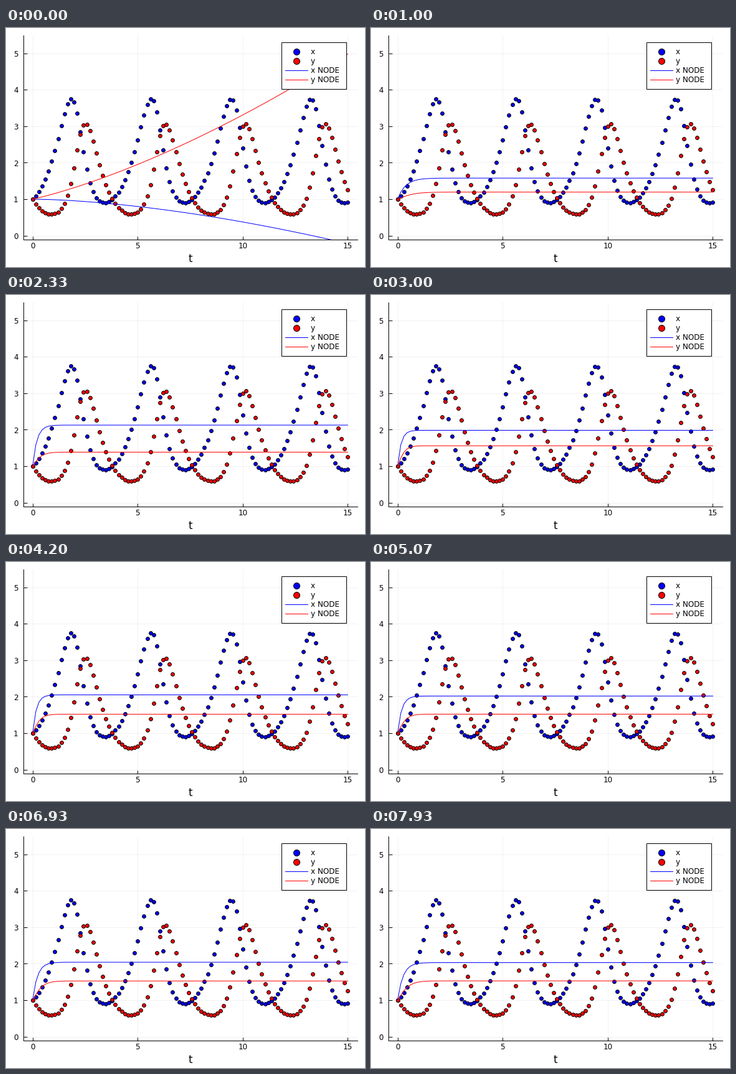
Write a matplotlib script that moves like this. It is 576 px wide and 384 px high and loops after 8000 ms.

```python
import numpy as np
import matplotlib.pyplot as plt
from matplotlib.animation import FuncAnimation
from matplotlib.patches import Rectangle

W, H, DPI = 576, 384, 100
PX = 72 / DPI
FRAMES, LOOP = 120, 8000
BLUE, RED = "#0000ff", "#ff0000"
T = np.linspace(0, 15, 100)

plt.rcParams["font.family"] = "DejaVu Sans"


def predator_prey(u):
    x, y = u
    return np.array([1.5 * x - x * y, x * y - 2 * y])


def solve(sub=10):
    """Runge-Kutta solution sampled at T."""
    u, h = np.array([1.0, 1.0]), (T[1] - T[0]) / sub
    out = [u]
    for _ in T[1:]:
        for _ in range(sub):
            a = predator_prey(u)
            b = predator_prey(u + h / 2 * a)
            c = predator_prey(u + h / 2 * b)
            d = predator_prey(u + h * c)
            u = u + h / 6 * (a + 2 * b + 2 * c + d)
        out.append(u)
    return np.array(out).T


def x_level(n):
    """Plateau of x: a ringing that slows and fades as training goes on."""
    r = max(n, 15) / 20.9
    return 2.035 + 0.32 * r ** -2.38 * np.cos(2 * np.pi * np.log(r) / 0.52)


def y_level(n):
    return np.interp(n, [15, 35, 45, 63, 119], [1.195, 1.395, 1.56, 1.52, 1.53])


def rate(n):
    return np.interp(n, [0, 45, 119], [1.0, 6.0, 3.8])


def fit(n, start, level, k, power):
    """Untrained curve giving way to a saturating rise."""
    settled = 1 + (level - 1) * (1 - np.exp(-(k * T) ** power))
    w = max(0, 1 - n / 9) ** 2
    return w * start + (1 - w) * settled


X_START = 1 - 0.01415 * T ** 1.645
Y_START = 1 + 0.1263 * T + 0.0209 * T ** 1.7

fig = plt.figure(figsize=(W / DPI, H / DPI), dpi=DPI, facecolor="white")
ax = fig.add_axes([27.5 / W, 44.5 / H, 536 / W, 328 / H])
ax.set(xlim=(-0.45, 15.45), ylim=(-0.1, 5.5),
       xticks=range(0, 16, 5), yticks=range(6))
ax.set_axisbelow(True)
ax.grid(color="black", alpha=0.05, lw=PX)
ax.tick_params(direction="in", length=5.5 * PX, width=PX, labelsize=12 * PX)
ax.tick_params(axis="x", pad=5 * PX)
ax.tick_params(axis="y", pad=8 * PX)
for side, spine in ax.spines.items():
    spine.set_visible(side in ("left", "bottom"))
    spine.set_linewidth(PX)


def dots(axes, x, y, color, size):
    axes.plot(x, y, "o", ms=size * PX, mfc=color, mec="black", mew=PX)


for values, color in zip(solve(), (BLUE, RED)):
    dots(ax, T, values, color, 5.8)
x_line, = ax.plot([], [], color=BLUE, lw=PX)
y_line, = ax.plot([], [], color=RED, lw=PX)

# Overlay in pixel coordinates for the legend and axis title
top = fig.add_axes([0, 0, 1, 1], zorder=5)
top.set(xlim=(0, W), ylim=(H, 0))
top.axis("off")
top.text(296, 376, "t", size=16.5 * PX, ha="center")
top.add_patch(Rectangle((441.5, 22.5), 104, 75, fc="white", ec="black", lw=PX))
for i, label in enumerate(("x", "y", "x NODE", "y NODE")):
    y, color = 37.7 + 15.1 * i, (BLUE, RED)[i % 2]
    if i < 2:
        dots(top, [465.7], [y], color, 10)
    else:
        top.plot([447.5, 483.5], [y, y], color=color, lw=PX)
    top.text(489, y + 4.5, label, size=12 * PX)


def update(n):
    k = rate(n)
    x_line.set_data(T, fit(n, X_START, x_level(n), k, 1.0))
    y_line.set_data(T, fit(n, Y_START, y_level(n), 0.62 * k, 1.2))
    return x_line, y_line


anim = FuncAnimation(fig, update, frames=FRAMES, interval=LOOP / FRAMES,
                     init_func=lambda: update(0), repeat=True,
                     repeat_delay=0, blit=False)
plt.show()
```
